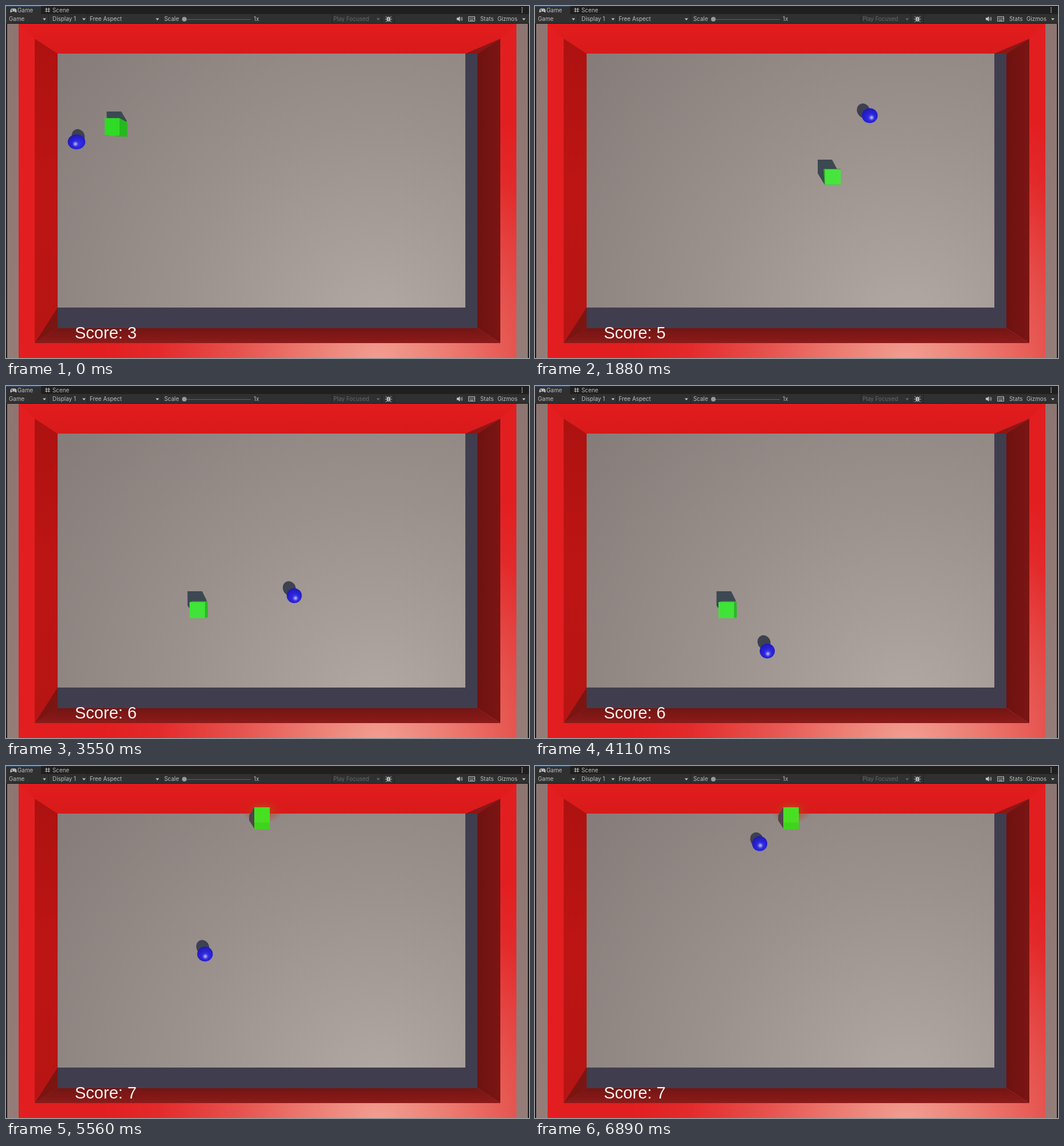
An HTML page that plays this animation: 912 px wide and 614 px high, repeating every 6.95 s.

```html
<!DOCTYPE html>
<html lang="en">
<head>
<meta charset="utf-8">
<title>Ball and cube</title>
<style>
  html, body { margin: 0; width: 100%; height: 100%; overflow: hidden; background: #191919; }
  svg { display: block; width: 912px; height: 614px; }
  .ui { font: 9.9px Inter, Roboto, sans-serif; fill: #bdbdbd; }
  .score { font: 29px "Liberation Sans", Arial, sans-serif; fill: #f5f1ef; }
</style>
</head>
<body>
<svg viewBox="0 0 912 614">
  <defs>
    <radialGradient id="floor" gradientUnits="userSpaceOnUse" cx="650" cy="560" r="720">
      <stop offset="0" stop-color="#b2a9a4"/>
      <stop offset=".2" stop-color="#a89f9a"/>
      <stop offset=".5" stop-color="#9a918d"/>
      <stop offset="1" stop-color="#867c79"/>
    </radialGradient>
    <radialGradient id="rim" gradientUnits="userSpaceOnUse" cx="650" cy="625" r="480">
      <stop offset="0" stop-color="#f2a093"/>
      <stop offset=".25" stop-color="#ec7c72"/>
      <stop offset=".5" stop-color="#e6544f"/>
      <stop offset=".8" stop-color="#e32a2b"/>
      <stop offset="1" stop-color="#e21e20"/>
    </radialGradient>
    <linearGradient id="topFace" x2="0" y2="1">
      <stop offset="0" stop-color="#e31c1e"/>
      <stop offset="1" stop-color="#d81a1a"/>
    </linearGradient>
    <linearGradient id="leftFace" x2="0" y2="1">
      <stop offset="0" stop-color="#ad1210"/>
      <stop offset=".5" stop-color="#bd1514"/>
      <stop offset="1" stop-color="#b61513"/>
    </linearGradient>
    <linearGradient id="bottomFace" x2="0" y2="1">
      <stop offset="0" stop-color="#741512"/>
      <stop offset="1" stop-color="#8c1b1a"/>
    </linearGradient>
    <linearGradient id="rightFace">
      <stop offset="0" stop-color="#6e1210"/>
      <stop offset="1" stop-color="#7b1514"/>
    </linearGradient>
    <linearGradient id="outside" x2="0" y2="1">
      <stop offset="0" stop-color="#8d7572"/>
      <stop offset="1" stop-color="#947d79"/>
    </linearGradient>
    <radialGradient id="ballFill" cx=".56" cy=".62" r=".62">
      <stop offset="0" stop-color="#403ae8"/>
      <stop offset=".45" stop-color="#2a24dc"/>
      <stop offset="1" stop-color="#2019b4"/>
    </radialGradient>
    <radialGradient id="shine">
      <stop offset="0" stop-color="#c6c3ec"/>
      <stop offset=".35" stop-color="#9b97ec" stop-opacity=".85"/>
      <stop offset="1" stop-color="#4a45e6" stop-opacity="0"/>
    </radialGradient>
    <radialGradient id="glow">
      <stop offset="0" stop-color="#9b6a10" stop-opacity=".9"/>
      <stop offset="1" stop-color="#d81a1a" stop-opacity="0"/>
    </radialGradient>
  </defs>

  <g id="arena">
    <path fill="url(#outside)" d="M2 31H910V614H2z"/>
    <path fill="url(#rim)" d="M22 31H890V614H22z"/>
    <path fill="url(#topFace)" d="M50 57L90 83H801L862 57L890 31H22z"/>
    <path fill="url(#leftFace)" d="M50 57L90 83V527L50 588z"/>
    <path fill="#7b1512" d="M90 526V562L50 588z"/>
    <path fill="url(#bottomFace)" d="M90 562H822L862 588H50z"/>
    <path fill="url(#rightFace)" d="M822 83L862 57V588L822 562z"/>
    <path fill="#8b1716" d="M801 83L862 57L822 83z"/>
    <path fill="#403d4e" d="M90 83H822V562H90z"/>
    <path fill="url(#floor)" d="M90 83H801V526H90z"/>
  </g>

  <ellipse id="glowSpot" cx="447" cy="78" rx="36" ry="22" fill="url(#glow)"/>
  <path id="cubeShadow"/>
  <path id="cubeSide"/>
  <path id="cubeTop"/>

  <ellipse id="ballShadow" rx="11.2" ry="12.8" fill="#3d4150"/>
  <ellipse id="ball" ry="13" fill="url(#ballFill)"/>
  <circle id="highlight" r="6" fill="url(#shine)"/>
  <text id="score" class="score" x="120" y="580"></text>

  <g id="toolbar">
    <path fill="#1f1f1f" d="M0 0H912V14H0z"/>
    <path fill="#303030" d="M0 0H61V14H0z"/>
    <path fill="#30547f" d="M0 0H61V1H0z"/>
    <path fill="#303030" d="M0 14H912V31H0z"/>
    <path fill="#1c1c1c" d="M0 30H912V31H0z"/>
    <path stroke="#222" d="M74.500 15V30M142.500 15V30M271.500 15V30M568.500 15V30M655.500 15V30M677.500 15V30"/>
    <path stroke="#606060" d="M311 23.500H427"/>
    <circle cx="311" cy="23" r="4" fill="#999"/>
    <g fill="#c4c4c4">
      <path d="M10 4.500H16C18 4.500 18.500 8 18.500 10C18.500 12 16.500 11.500 15.500 9.500H10.500C9.500 11.500 7.500 12 7.500 10C7.500 8 8 4.500 10 4.500z"/>
      <path stroke="#303030" stroke-width=".9" d="M9 7.200H12M10.500 5.700V8.700M14.500 7.200H16"/>
      <circle cx="900" cy="3.500" r="1"/><circle cx="900" cy="7" r="1"/><circle cx="900" cy="10.500" r="1"/>
      <path d="M786 20.500H788.500L791.500 18V27L788.500 24.500H786z"/>
      <ellipse cx="667" cy="23" rx="3" ry="4.200"/>
    </g>
    <g fill="none" stroke="#bdbdbd">
      <path d="M70.500 3V11M74.500 3V11M68 5.500H77M68 9H77"/>
      <path d="M793 20.500Q794.500 22.500 793 24.500M794.700 19Q797 22.500 794.700 26"/>
      <path d="M806.500 18.500H817.500V26.500H806.500z"/>
      <path stroke-dasharray="1.500 1" d="M808 20.800H817M808 22.800H817"/>
      <path d="M809 24.800H815"/>
      <path d="M662 18L665 21M672 18L669 21M661 23H673M662 28L665 25M672 28L669 25"/>
      <path stroke="#333" d="M667 20V27" stroke-width=".8"/>
    </g>
  </g>
</svg>
<script>
const LOOP = 6950, STEP = 69.5;
const $ = id => document.getElementById(id);
const set = (id, attrs) => {
  for (const key in attrs) $(id).setAttribute(key, attrs[key]);
};

function add(tag, attrs, text = '') {
  const node = document.createElementNS('http://www.w3.org/2000/svg', tag);
  for (const key in attrs) node.setAttribute(key, attrs[key]);
  node.textContent = text;
  $('toolbar').append(node);
}

const DIM = '#686868';
const labels = [
  ['Game', 20, 11], ['Scene', 81, 11], ['Game', 5, 26], ['Display 1', 81, 26],
  ['Free Aspect', 146, 26], ['Scale', 276, 26], ['1x', 432, 26],
  ['Play Focused', 571, 26, DIM], ['Stats', 827, 26], ['Gizmos', 857, 26]
];
for (const [text, x, y, color = '#bdbdbd'] of labels)
  add('text', { class: 'ui', x, y, style: `fill:${color}` }, text);
for (const x of [67, 136, 264, 649, 903])
  add('path', { d: `M${x - 3} 21.500h6l-3 3.500z`, fill: x === 649 ? DIM : '#c4c4c4' });

// Each cube lasts until the ball collects it.
const cubes = [
  { until: 160, top: 'M172 195.500H198V226L184 227L172 224z', side: 'M198 195.500L211.500 203V228L184 227L198 224z',
    shadow: 'M175.500 184H201L211 201L198 206H175.500z', fill: '#2edb25', dark: '#25b81f' },
  { until: 620, top: 'M317 193H343V221H317z', side: 'M343 193L352 198V222L343 221z',
    shadow: 'M316 180H341L351 197L343 206H316z', fill: '#32df29', dark: '#27bd20' },
  { until: 3020, top: 'M505.500 285H533V311.500H505.500z', side: 'M503 284H533V311.500H505z',
    shadow: 'M493 268H518L527 285V300L505 311.500L493 292z', fill: '#46e53c', dark: '#2da52a' },
  { until: 5260, top: 'M320 377H347V405H320z', side: 'M320 377L325 375.500H351.500L352 403L347 405z',
    shadow: 'M316.500 358H342L350 374V388H320L316.500 383z', fill: '#40e338', dark: '#2bb727' },
  { until: LOOP, top: 'M433 72H460V98.500H433z', side: 'M433 98H460V110.500H433z',
    shadow: 'M433 72V109L424 95V86z', fill: '#48df22', dark: '#3fd41c', shade: '#51434b' }
];

// Ball route: time, x, y
const route = [
  [0, 123, 237], [170, 162, 226], [600, 302, 209], [1110, 440, 193],
  [1500, 523, 186], [1900, 586, 192], [2250, 590, 212], [2630, 553, 246],
  [2990, 543, 272], [3300, 525, 315], [3550, 502, 367], [3800, 468, 424],
  [4200, 385, 468], [4730, 294, 453], [5000, 299, 430], [5280, 318, 393],
  [5560, 347, 328], [5950, 374, 235], [6350, 385, 165], [6890, 392, 135], [6950, 393, 134]
];

function slope(i, axis) {
  const a = route[Math.max(i - 1, 0)], b = route[Math.min(i + 1, route.length - 1)];
  return (b[axis] - a[axis]) / (b[0] - a[0]);
}

function along(t, axis) {
  const i = Math.max(1, route.findIndex(p => p[0] >= t));
  const a = route[i - 1], b = route[i], span = b[0] - a[0];
  const u = (t - a[0]) / span, v = 1 - u;
  return a[axis] * v * v * (1 + 2 * u) + b[axis] * u * u * (3 - 2 * u)
    + span * u * v * (slope(i - 1, axis) * v - slope(i, axis) * u);
}

function draw(time) {
  const t = Math.min(Math.floor((time + 11) / STEP) * STEP, LOOP);
  const x = along(t, 1), y = along(t, 2);
  const shadowX = x - (x - 220) / 33, shadowY = y - 4 - y * .024;
  set('ballShadow', { cx: shadowX, cy: shadowY, transform: `rotate(-25 ${shadowX} ${shadowY})` });
  set('ball', { cx: x, cy: y, rx: 12.8 + Math.abs(x - 456) / 130 });
  set('highlight', { cx: x + (x - 300) / 90, cy: y + 2.500 + y / 200 });

  const index = cubes.findIndex(c => t < c.until);
  const level = index < 0 ? cubes.length - 1 : index, cube = cubes[level];
  set('cubeTop', { d: cube.top, fill: cube.fill });
  set('cubeSide', { d: cube.side, fill: cube.dark });
  set('cubeShadow', { d: cube.shadow, fill: cube.shade || '#3c4852' });
  set('glowSpot', { opacity: level === cubes.length - 1 ? 1 : 0 });
  $('score').textContent = `Score: ${3 + level}`;
}

const start = performance.now();
function tick() {
  draw((performance.now() - start) % LOOP);
  requestAnimationFrame(tick);
}
tick();
</script>
</body>
</html>
```
